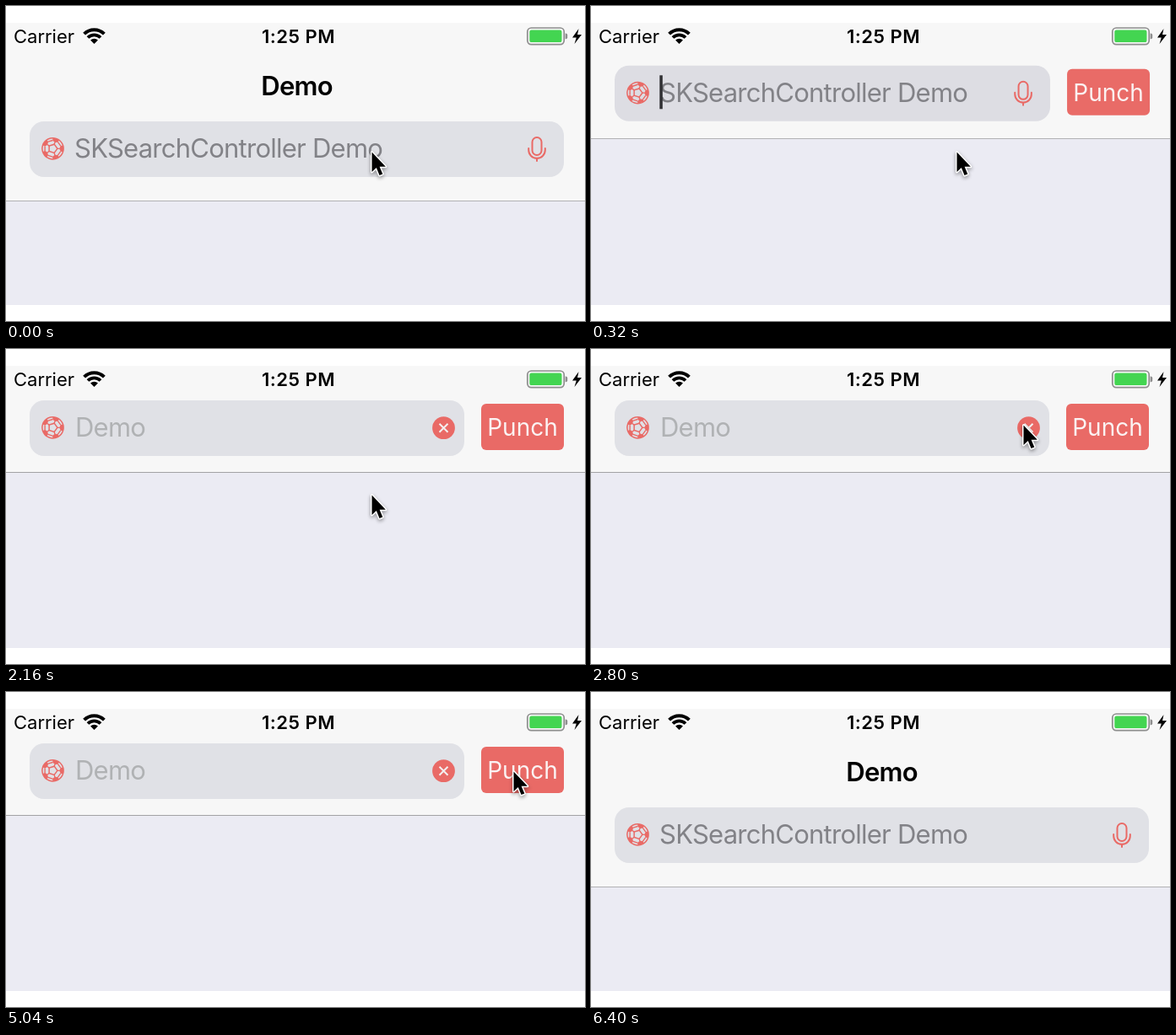
These frames come from a looping animation (686x374 px, 6.48 s). An HTML page with a canvas:

```html
<!DOCTYPE html>
<html lang="en">
<head>
<meta charset="utf-8">
<title>Search bar demo</title>
<style>
  html, body { margin: 0; width: 100%; height: 100%; overflow: hidden; background: #fff; }
  canvas { display: block; width: 686px; height: 374px; }
</style>
</head>
<body>
<canvas id="stage" width="686" height="374"></canvas>
<script>
const ctx = document.getElementById('stage').getContext('2d');
const LOOP = 6480, STEP = 80, CORAL = '#e96a66', FAMILY = 'Inter, Roboto, sans-serif';
const FOCUS = 80, CLEAR = 2960, CANCEL = 5760, SLIDE = 320;
const KEYS = [1040, 1200, 1360, 1520, 3840, 4080, 4240, 4400];
const POINTER = [
  [0, 433, 173], [2240, 433, 173], [2720, 512, 90], [2960, 512, 90],
  [3360, 415, 154], [3680, 415, 150], [4240, 415, 150], [4320, 425, 142],
  [4960, 601, 94], [6000, 601, 94], [6240, 690, 24]
];

const clamp = v => Math.min(1, Math.max(0, v));
const mix = (a, b, p) => a + (b - a) * p;
const ease = v => {
  const x = clamp(v), a = x ** 1.74, b = (1 - x) ** 1.74;
  return a / (a + b);
};

function withAlpha(alpha, draw) {
  if (alpha <= 0) return;
  ctx.save();
  ctx.globalAlpha *= alpha;
  draw();
  ctx.restore();
}

function setFont(size, weight, spacing) {
  ctx.font = `${weight} ${size}px ${FAMILY}`;
  ctx.letterSpacing = spacing + 'px';
}

function label(text, x, y, { size = 31, weight = 400, spacing = 0, color = '#000', align = 'left' } = {}) {
  setFont(size, weight, spacing);
  ctx.fillStyle = color;
  ctx.textAlign = align;
  ctx.fillText(text, x, y);
}

function rect(x, y, w, h, color) {
  ctx.fillStyle = color;
  ctx.fillRect(x, y, w, h);
}

function roundRect(x, y, w, h, r, color) {
  ctx.beginPath();
  ctx.roundRect(x, y, w, h, r);
  ctx.fillStyle = color;
  ctx.fill();
}

function polygon(points) {
  ctx.beginPath();
  points.forEach(([x, y]) => ctx.lineTo(x, y));
  ctx.closePath();
}

function stroke(color, width) {
  ctx.strokeStyle = color;
  ctx.lineWidth = width;
  ctx.stroke();
}

function drawStatus() {
  label('Carrier', 9, 44, { size: 22 });
  label('1:25 PM', 346.5, 44, { size: 22, weight: 600, spacing: 0.5, align: 'center' });

  const from = -Math.PI * 0.75, to = -Math.PI * 0.25;
  [[16.8, 4], [10.6, 3.8]].forEach(([r, w]) => {
    ctx.beginPath();
    ctx.arc(104.5, 45, r, from, to);
    stroke('#000', w);
  });
  ctx.beginPath();
  ctx.moveTo(104.5, 45);
  ctx.arc(104.5, 45, 6.3, from, to);
  ctx.fillStyle = '#000';
  ctx.fill();

  ctx.beginPath();
  ctx.roundRect(617.8, 26, 43.4, 19.6, 4.5);
  stroke('#8e8e8e', 1.7);
  roundRect(620.3, 28.5, 38.2, 14.6, 2.2, '#43d551');
  roundRect(662.6, 32.5, 2.6, 6.8, [0, 2, 2, 0], '#8e8e8e');
  polygon([[678.5, 27], [671, 37.5], [675.8, 37.5], [673.5, 45], [682, 34], [677, 34]]);
  ctx.fillStyle = '#000';
  ctx.fill();
}

function drawBall(x, y) {
  ctx.save();
  ctx.translate(x, y);
  ctx.rotate(0.32);
  ctx.beginPath();
  ctx.arc(0, 0, 12.6, 0, 7);
  stroke(CORAL, 1.5);
  ctx.clip();
  ctx.fillStyle = CORAL;
  const polar = (r, a) => [r * Math.cos(a), r * Math.sin(a)];
  const turn = Math.PI * 2 / 5;
  const corners = [0, 1, 2, 3, 4].map(i => i * turn - Math.PI / 2);
  polygon(corners.map(a => polar(5.4, a)));
  stroke(CORAL, 1.5);
  corners.forEach(a => {
    polygon([polar(7.8, a), polar(9.8, a - 0.36), polar(13, a - 0.3),
             polar(13, a + 0.3), polar(9.8, a + 0.36)]);
    ctx.fill();
    ctx.beginPath();
    ctx.moveTo(...polar(5, a));
    ctx.lineTo(...polar(8, a));
    ctx.moveTo(...polar(9.8, a + 0.34));
    ctx.lineTo(...polar(9.8, a + turn - 0.34));
    stroke(CORAL, 1.4);
  });
  ctx.restore();
}

function drawMic(x, y) {
  ctx.lineCap = 'round';
  ctx.beginPath();
  ctx.roundRect(x - 5.5, y + 19, 11, 21, 5.5);
  stroke(CORAL, 2);
  ctx.beginPath();
  ctx.moveTo(x - 9.8, y + 32);
  ctx.lineTo(x - 9.8, y + 34);
  ctx.arc(x, y + 34, 9.8, Math.PI, 0, true);
  ctx.lineTo(x + 9.8, y + 32);
  ctx.moveTo(x, y + 44);
  ctx.lineTo(x, y + 47);
  stroke(CORAL, 2);
  ctx.lineCap = 'butt';
}

function drawClear(x, y) {
  ctx.beginPath();
  ctx.arc(x, y, 13.4, 0, 7);
  ctx.fillStyle = CORAL;
  ctx.fill();
  ctx.beginPath();
  [-1, 1].forEach(s => {
    ctx.moveTo(x - 5, y - 5 * s);
    ctx.lineTo(x + 5, y + 5 * s);
  });
  stroke('#f3efef', 2);
}

function drawPointer(t) {
  const i = POINTER.findIndex(k => k[0] > t);
  if (i < 0) return;
  const [t0, x0, y0] = POINTER[i - 1], [t1, x1, y1] = POINTER[i];
  const p = ease((t - t0) / (t1 - t0));
  ctx.save();
  ctx.translate(mix(x0, x1, p), mix(y0, y1, p));
  polygon([[0.5, 0.5], [0.5, 24], [5.8, 19], [9.5, 28], [13.3, 26.4], [9.6, 17.8], [16.8, 17.8]]);
  ctx.lineJoin = 'round';
  ctx.shadowColor = 'rgba(0,0,0,.4)';
  ctx.shadowBlur = 4;
  ctx.shadowOffsetY = 2;
  stroke('#fff', 3);
  ctx.shadowColor = 'transparent';
  ctx.fillStyle = '#000';
  ctx.fill();
  ctx.restore();
}

function typedText(t) {
  if (t > CANCEL) return '';
  const start = t >= CLEAR ? CLEAR : 0;
  return 'Demo'.slice(0, KEYS.filter(k => k > start && k <= t).length);
}

function caretOn(t) {
  if (t < 240 || t >= CANCEL) return false;
  const last = Math.max(...[240, CLEAR, ...KEYS].filter(k => k <= t));
  return (t - last) % 800 < 480;
}

function drawSearch(t) {
  const leaving = t >= CANCEL;
  const back = ease((t - CANCEL) / SLIDE);
  const lift = leaving ? 1 - back : ease((t - FOCUS) / SLIDE);
  const narrow = leaving ? 1 - back : t < FOCUS ? 0 : ease((t - 20) / SLIDE);
  const y = mix(137, 61, lift), right = mix(661, 543, narrow);
  const lineY = Math.round(mix(231, 146, lift));
  const typed = typedText(t);

  rect(0, 20, 686, lineY - 20, '#f7f7f7');
  rect(0, lineY, 686, 1, lift === 1 ? '#a2a2a4' : '#b2b2b4');
  rect(0, lineY + 1, 686, 354 - lineY, '#ebebf3');

  withAlpha(clamp(1 - narrow * 1.6), () =>
    label('Demo', 344.5, 106, { weight: 600, spacing: -0.75, align: 'center' }));

  roundRect(28, y, right - 28, 66, 17, t >= 160 && t < 480 ? '#dddde3' : '#e0e1e6');
  const fade = leaving ? mix(0.75, 1, back) : 1;
  withAlpha(fade, () => {
    drawBall(55.5, y + 32.3);
    if (!typed) label('SKSearchController Demo', 81, y + 43, { spacing: -0.75, color: '#828287' });
  });

  if (typed) {
    label(typed, 82, y + 43, { spacing: -0.75, color: '#b0b2b4' });
    drawClear(right - 24.5, y + 32.7);
  } else {
    withAlpha(leaving ? clamp(back * 1.5 - 0.5) : 1, () => drawMic(right - 32, y));
  }

  if (caretOn(t)) {
    setFont(31, 400, -0.75);
    const x = typed ? 81.3 + ctx.measureText(typed).width : 81.3;
    rect(x, y + 11.5, 3.5, 40, '#303033');
  }

  withAlpha(narrow, () => {
    roundRect(right + 20, y + 4, 98, 55, 6, CORAL);
    withAlpha(t >= CANCEL - STEP ? 0.35 : 1, () =>
      label('Punch', right + 69, y + 42, { size: 28, color: '#fbf3f3', align: 'center' }));
  });
}

function render(now) {
  const t = Math.floor((now % LOOP) / STEP) * STEP;
  rect(0, 0, 686, 374, '#fff');
  drawSearch(t);
  drawStatus();
  drawPointer(t);
}

const start = performance.now();
function tick() {
  render(performance.now() - start);
  requestAnimationFrame(tick);
}
tick();
</script>
</body>
</html>
```
